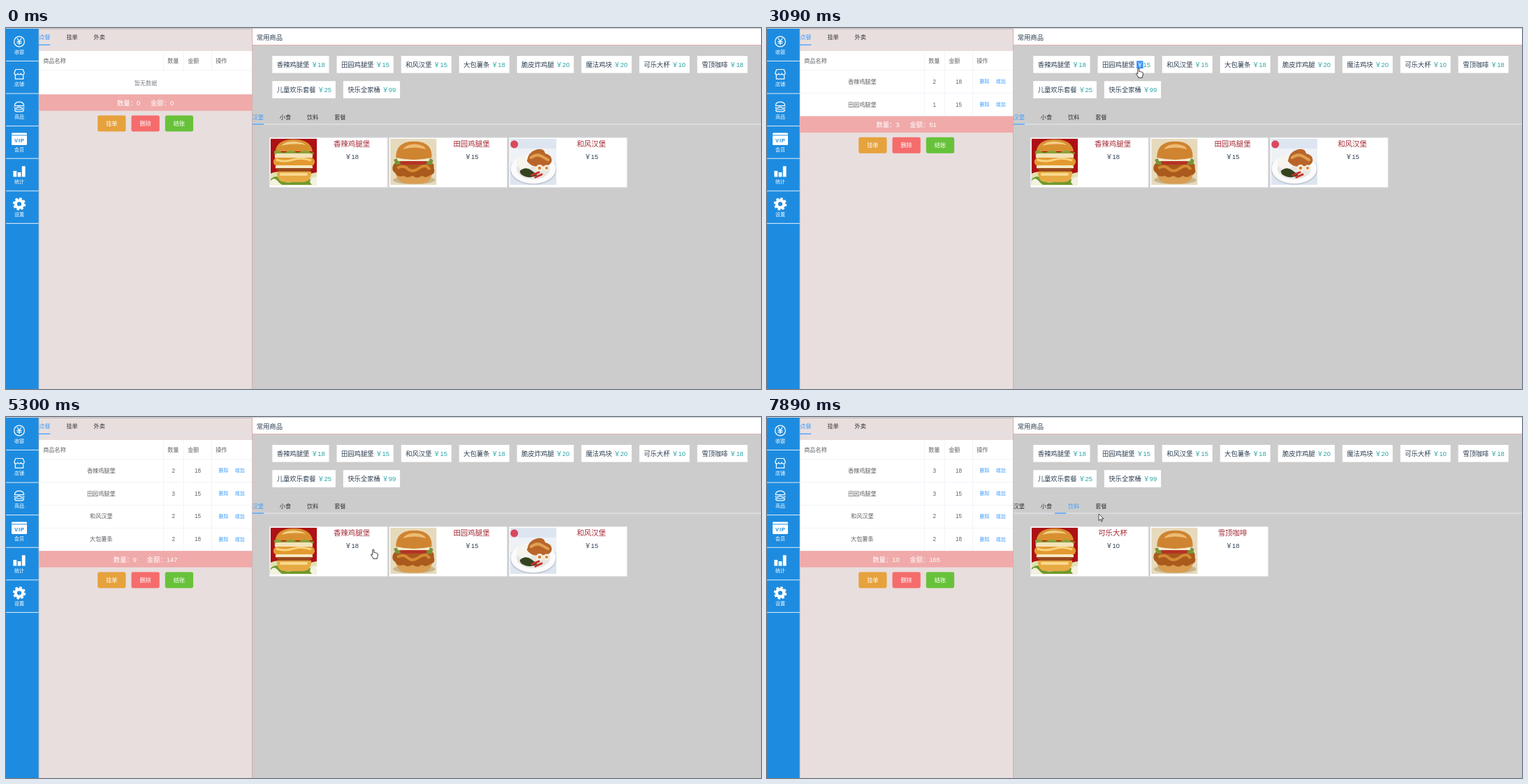
These frames come from a looping animation (1081x518 px, 8 s). An HTML page:

```html
<!DOCTYPE html>
<html lang="zh-CN">
<head>
<meta charset="utf-8">
<title>点餐收银</title>
<style>
  html, body { margin: 0; width: 100%; height: 100%; overflow: hidden; background: #ccc; }
  svg { display: block; }
  text { font-family: "Liberation Sans", Arial, "Noto Sans CJK SC", "Noto Sans CJK", sans-serif; white-space: pre; }
  .line { fill: none; stroke: #fff; stroke-width: 1.2; stroke-linejoin: round; stroke-linecap: round; }
</style>
</head>
<body>
<svg id="stage" width="1081" height="518" viewBox="0 0 1081 518">
  <defs>
    <symbol id="photo0" viewBox="0 0 66 66">
      <rect width="66" height="66" fill="#ad1116"/>
      <path d="M0 50Q10 44 20 52T46 54T66 48V66H0z" fill="#dfe3b4"/>
      <path d="M0 58Q8 50 16 58T34 60T52 57T66 54V66H0z" fill="#6f9a2b"/>
      <path d="M7 18Q9 1 33 1T60 18z" fill="#d8902f"/>
      <path d="M15 10Q22 3 34 4T50 9Q34 6 15 10z" fill="#f3cd83"/>
      <path d="M5 18q5-3 9 0t10 0t10 0t10 0t10 0t8 1l-2 5H6z" fill="#8ba33a"/>
      <rect x="6" y="21" width="54" height="8" rx="4" fill="#f4e3ba"/>
      <rect x="4" y="27" width="59" height="12" rx="6" fill="#e39a2f"/>
      <path d="M8 30q12 4 24 0t26 1" fill="none" stroke="#f8d27d" stroke-width="3"/>
      <rect x="7" y="38" width="53" height="5" rx="2" fill="#f6e9c4"/>
      <path d="M7 42h53l-5 5H12z" fill="#9a4a1c"/>
      <path d="M9 47h49q0 15-12 15H21Q9 62 9 47z" fill="#e7aa43"/>
      <path d="M15 51h36" stroke="#f8d98c" stroke-width="4" stroke-linecap="round"/>
      <path d="M0 60q5-6 10 0t8 6H0zM66 54q-9 0-10 8l3 4h7z" fill="#f3f1df"/>
    </symbol>
    <symbol id="photo1" viewBox="0 0 66 66">
      <rect width="66" height="66" fill="#e6dabd"/>
      <ellipse cx="34" cy="59" rx="30" ry="6" fill="#c9b58c"/>
      <path d="M8 48h52q-2 16-17 16H25Q9 64 8 48z" fill="#d99c50"/>
      <path d="M4 38q3-6 12-5h38q10 1 8 9q3 8-5 10q-6 5-12 1q-7 5-13 0q-8 4-13 0q-9 3-12-4q-6-4-3-11z" fill="#a95a1c"/>
      <path d="M10 42q9-5 15 1t16-1t15 2" fill="none" stroke="#d68a35" stroke-width="4"/>
      <path d="M5 30q6-3 10 2t12 0t12 1t11-1t11-1l-2 6H8z" fill="#789238"/>
      <rect x="14" y="31" width="38" height="6" rx="3" fill="#b53324"/>
      <rect x="10" y="27" width="46" height="5" rx="2.5" fill="#f2ead0"/>
      <path d="M8 27Q8 4 34 4T59 27Q34 33 8 27z" fill="#cf8431"/>
      <path d="M18 15Q24 7 36 8T51 15Q34 10 18 15z" fill="#eebb72"/>
    </symbol>
    <symbol id="photo2" viewBox="0 0 66 66">
      <rect width="66" height="66" fill="#dde5f0"/>
      <rect y="14" width="66" height="20" fill="#eef1f5"/>
      <ellipse cx="33" cy="45" rx="33" ry="21" fill="#c5ccd6"/>
      <ellipse cx="33" cy="43" rx="32" ry="21" fill="#fbfbfb"/>
      <ellipse cx="33" cy="43" rx="24" ry="15" fill="#e8e6e2"/>
      <ellipse cx="21" cy="34" rx="12" ry="10" fill="#f7f4ee"/>
      <path d="M24 32q2-13 12-16q12-4 14 5q11 3 9 12q-3 7-14 6q-14 3-21-7z" fill="#b9652a"/>
      <path d="M30 27q8-6 15-2t9 5" fill="none" stroke="#e0a052" stroke-width="4" stroke-linecap="round"/>
      <path d="M14 46q8-7 16-1t9 7q-8 5-17 2t-8-8z" fill="#34431f"/>
      <circle cx="42" cy="42" r="5" fill="#f6efe0"/><circle cx="42" cy="42" r="2.3" fill="#d98332"/>
      <circle cx="52" cy="42" r="4.5" fill="#f6efe0"/><circle cx="52" cy="42" r="2" fill="#d98332"/>
      <path d="M31 52l10-4M36 55l9-4" stroke="#c5332a" stroke-width="3" stroke-linecap="round"/>
      <circle cx="6" cy="8" r="5.5" fill="#d9485c"/>
    </symbol>
  </defs>
  <g id="base"></g>
  <g id="live"></g>
  <g id="cursor">
    <path id="arrow" d="M0 0V9.6L2.3 7.5L3.8 11L5.3 10.3L3.9 7H7z" fill="#fff" stroke="#222" stroke-width=".8"/>
    <path id="hand" d="M-1.2 8V1Q-1.2 0 -.2 0T.9 1V4.6Q1.9 3.9 2.7 4.9Q3.8 4.3 4.5 5.4Q6.2 5 6.3 6.6V9Q6.3 10.6 5.3 12V13.3H-.4V12.2L-3.3 8.3Q-3.6 6.7 -2.4 7z" fill="#fff" stroke="#222" stroke-width=".9"/>
  </g>
</svg>
<script>
const LOOP = 8000, BIG = 9.33, MID = 8.17, SMALL = 7;
const BLUE = '#409eff', INK = '#2c3e50', DARK = '#303133', GREY = '#606266';
const $ = id => document.getElementById(id);

const rect = (x, y, w, h, fill, more = '') =>
  `<rect x="${x}" y="${y}" width="${w}" height="${h}" fill="${fill}" ${more}/>`;
// Text placed by its vertical middle
const text = (x, mid, str, size, fill, anchor = 'start') =>
  `<text x="${x}" y="${mid + size * .37}" font-size="${size}" fill="${fill}" text-anchor="${anchor}">${str}</text>`;
const centred = (x, mid, str, size, fill) => text(x, mid, str, size, fill, 'middle');

const dishes = [
  ['香辣鸡腿堡', 18], ['田园鸡腿堡', 15], ['和风汉堡', 15], ['大包薯条', 18], ['脆皮炸鸡腿', 20],
  ['魔法鸡块', 20], ['可乐大杯', 10], ['雪顶咖啡', 18], ['儿童欢乐套餐', 25], ['快乐全家桶', 99]
];
const tabs = [['汉堡', [0, 1, 2]], ['小食', [3, 4, 5]], ['饮料', [6, 7]], ['套餐', [8, 9]]];
const tabX = i => 352.6 + i * 39.2;

let flowX = 381.3;
const chips = dishes.map(([name, price], i) => {
  if (i === 8) flowX = 381.3;
  const x = flowX, w = name.length * BIG + 34.6;
  flowX += w + 11;
  return { x, w, y: i < 8 ? 40 : 76.2, name, price, priceX: x + 9 + name.length * BIG };
});

function sidebar() {
  let s = rect(0, 1, 47, 517, '#1d8ce0');
  ['收银', '店铺', '商品', '会员', '统计', '设置'].forEach((label, i) => {
    const y = i * 46.6;
    s += centred(19, 34.2 + y, label, SMALL, '#fff') + rect(0, 46.9 + y, 47, 1, '#e4eefa');
  });
  s += `<g class="line">
    <circle cx="19" cy="19.5" r="7.4"/>
    <path d="M16.2 15.2L19 19L21.8 15.2M19 19V24M16 19.4H22M16 21.7H22"/>
    <path d="M13.8 59.5H24.2L26.2 64.5Q25.8 67.2 23.6 67.2T21.2 65Q20.8 67.2 19 67.2T16.8 65Q16.4 67.2 14.4 67.2T11.8 64.5zM13.3 68V73.2H24.7V68"/>
    <path d="M12.3 111.6Q12.6 106.2 19 106.2T25.7 111.6zM12 114.2Q14 116 16.3 114.2T21 114.2T26 114.2M12.5 117H25.5Q25.5 119.8 23 119.8H15Q12.5 119.8 12.5 117z"/>
  </g>`;
  s += rect(8, 150.5, 22, 17.5, '#fff', 'rx="1.2"') + rect(8, 153.4, 22, 1, '#1d8ce0');
  s += `<text x="19.4" y="164" font-size="7.6" font-weight="bold" letter-spacing=".8" fill="#1d8ce0" text-anchor="middle">VIP</text>`;
  s += rect(10.4, 205, 4.8, 8.6, '#fff') + rect(16.6, 207, 4.8, 6.6, '#fff') + rect(22.8, 198.3, 4.8, 15.3, '#fff');
  s += `<circle cx="19" cy="252.5" r="5.2" fill="none" stroke="#fff" stroke-width="4.2"/>
    <circle cx="19" cy="252.5" r="7.9" fill="none" stroke="#fff" stroke-width="2.6" stroke-dasharray="3.5 2.705"/>`;
  return s;
}

function base() {
  let s = rect(0, 0, 1081, 518, '#ccc') + rect(0, 0, 1081, 1.2, '#d3d3d3') + sidebar();
  s += rect(47, 1, 305.5, 517, '#e8dede') + rect(47, .9, 306, .8, '#b9a9a9') + rect(46.6, 1, .8, 517, '#b4b4be');
  s += rect(47, 23.8, 305.5, 1.1, '#dfe4ed') + rect(47, 23.6, 16.4, 1.3, BLUE);
  ['点餐', '挂单', '外卖'].forEach((name, i) => s += text(47.2 + i * 39.2, 13.4, name, MID, i ? DARK : BLUE));
  s += rect(353, 1.2, 728, 23, '#fff') + rect(353, 24, 728, .9, '#dcabab') + rect(352.1, 1, .9, 517, '#dca6a6');
  s += text(358.7, 13.2, '常用商品', BIG, INK);
  chips.forEach(c => {
    s += rect(c.x, c.y, c.w, 24.6, '#fff') + text(c.x + 6.4, c.y + 12.6, c.name, BIG, INK)
      + text(c.priceX, c.y + 12.6, '￥' + c.price, BIG, '#2ba3a5');
  });
  return s + rect(353, 137.6, 728, 1.1, '#e4e7ed');
}

const steps = [[900, 1840, 8], [1990, 2820, 7], [3090, 3090, 1], [3210, 3760, 5], [3900, 4030, 2],
  [4180, 5180, 8], [5300, 5300, 1], [5420, 6200, 7], [6350, 6890, 5], [7040, 7320, 3], [7470, 7890, 4]]
  .flatMap(([a, b, n]) => Array.from({ length: n }, (_, i) => Math.round(a + (n > 1 ? (b - a) * i / (n - 1) : 0))));

const pointer = [[900, 995, 501], [1170, 820, 372], [1440, 570, 236], [1706, 425, 146], [1840, 457, 128],
  [2128, 438, 72], [2267, 441, 57], [2543, 442, 57], [2820, 532, 58], [3210, 532, 58], [3485, 590, 56],
  [3760, 600, 54], [3900, 602, 55], [4030, 690, 57], [4323, 690, 57], [4609, 660, 105], [4894, 590, 190],
  [5180, 584, 195], [5300, 526, 190], [5550, 505, 192], [5810, 500, 194], [6200, 466, 194],
  [6350, 456, 211], [6620, 424, 160], [6890, 408, 130], [7180, 409, 130], [7470, 421, 131],
  [7750, 440, 131], [7890, 475, 139]];
const underline = [[7000, tabX(0)], [7320, tabX(1)], [7720, tabX(1)], [7890, 412]];

// Clicks that add one dish: time, dish
const orders = [[2405, 0], [2543, 0], [3090, 1], [3210, 1], [3760, 2], [3900, 2], [4180, 3], [4323, 3], [5037, 1], [5550, 0]];

function along(path, t) {
  const i = path.findIndex(p => p[0] > t);
  if (i < 0) return path[path.length - 1].slice(1);
  if (i === 0) return path[0].slice(1);
  const a = path[i - 1], b = path[i], k = (t - a[0]) / (b[0] - a[0]);
  return a.slice(1).map((v, j) => v + (b[j + 1] - v) * k);
}

// Highlighted words: from, to, x, middle, word, size, extra width
const marks = [
  [2543, 3090, chips[0].priceX, 52.6, '￥', BIG, 0],
  [3090, 3485, chips[1].priceX, 52.6, '￥', BIG, 0],
  [3760, 4180, chips[2].x + 6.4 + 2 * BIG, 52.6, '汉堡', BIG, 2.6],
  [4180, 5037, chips[3].x + 6.4 + 2 * BIG, 52.6, '薯条', BIG, 2.6],
  [7180, 7750, 300.2, 47, '操作', MID, 0]
];

function table(t) {
  const count = new Map();
  orders.forEach(([at, d]) => at <= t && count.set(d, (count.get(d) || 0) + 1));
  const rows = [...count].sort((a, b) => a[0] - b[0]);
  const foot = rows.length ? 61 + 32.8 * rows.length : 95.3;
  const edge = '#ebeef5';
  let s = rect(47.4, 33, 304.8, foot - 33, '#fff') + rect(47.4, 60.5, 304.8, .7, edge);
  [225.2, 253.8, 294.2].forEach(x => s += rect(x, 33, .7, rows.length ? foot - 33 : 28, edge));
  [[53.2, '商品名称'], [231.2, '数量'], [260.2, '金额'], [300.2, '操作']]
    .forEach(([x, name]) => s += text(x, 47, name, MID, GREY));
  if (!rows.length) s += centred(200, 78.8, '暂无数据', MID, '#7d8188');
  let total = 0, sum = 0;
  rows.forEach(([d, n], i) => {
    const [name, price] = dishes[d], y = 76.8 + i * 32.8;
    total += n;
    sum += n * price;
    s += centred(136.3, y, name, MID, GREY) + centred(239.7, y, n, MID, GREY) + centred(274.5, y, price, MID, GREY)
      + text(304.6, y, '删除', SMALL, BLUE) + text(327.8, y, '增加', SMALL, BLUE)
      + rect(47.4, 93.3 + i * 32.8, 304.8, .7, edge);
  });
  s += rect(47.4, foot, 304.8, 23.5, '#f0aaaa');
  s += centred(199.6, foot + 12.3, `数量：${total}<tspan dx="14.8">金额：${sum}</tspan>`, BIG, '#fff');
  [['挂单', '#e6a23c'], ['删除', '#f56c6c'], ['结账', '#67c23a']].forEach(([name, fill], i) => {
    const x = 131.2 + i * 48.3;
    s += rect(x, foot + 30.2, 40.3, 23, fill, 'rx="2.3"') + centred(x + 20.1, foot + 41.8, name, MID, '#fff');
  });
  return s;
}

function menu(t, active, hover) {
  let s = '';
  tabs.forEach(([name], i) => s += text(tabX(i), 127.5, name, MID, i === active || i === hover ? BLUE : DARK));
  s += rect(along(underline, t)[0], 137.4, 16.4, 1.3, BLUE);
  tabs[active][1].forEach((d, i) => {
    const x = 377.2 + i * 171.5, [name, price] = dishes[d];
    s += rect(x, 157.2, 169, 71.6, '#fff', 'stroke="#dcdfe4" stroke-width=".7"');
    s += `<use href="#photo${i}" x="${x + 1.5}" y="158.8" width="66.4" height="66.4"/>`;
    s += centred(x + 117.8, 166.5, name, 10.45, '#a52a35') + centred(x + 117.8, 185, '￥' + price, BIG, INK);
  });
  return s;
}

function draw(t) {
  const active = t >= 7750 ? 2 : t >= 7040 ? 1 : 0;
  const [x, y] = along(pointer, t);
  const shown = t >= 900;
  const hover = shown && y > 117 && y < 138 ? tabs.findIndex((_, i) => x > tabX(i) - 2 && x < tabX(i) + 19) : -1;
  const onChip = chips.some(c => x > c.x && x < c.x + c.w && y > c.y && y < c.y + 24.6);
  const onCard = x > 377 && x < 889 && y > 157 && y < 229;
  const link = hover >= 0 || onChip || onCard;

  let s = table(t) + menu(t, active, hover);
  marks.forEach(([from, to, mx, mid, word, size, extra]) => {
    if (t < from || t >= to) return;
    s += rect(mx, mid - size * .58, word.length * size + extra, size * 1.17, '#3390ff') + text(mx, mid, word, size, '#fff');
  });
  $('live').innerHTML = s;
  $('cursor').setAttribute('transform', `translate(${x} ${y})`);
  $('cursor').style.display = shown ? '' : 'none';
  $('hand').style.display = link ? '' : 'none';
  $('arrow').style.display = link ? 'none' : '';
}

let last = -1;
function tick() {
  const t = performance.now() % LOOP;
  const step = steps.reduce((held, at) => at <= t ? at : held, 0);
  if (step !== last) draw(last = step);
  requestAnimationFrame(tick);
}
$('base').innerHTML = base();
tick();
</script>
</body>
</html>
```
